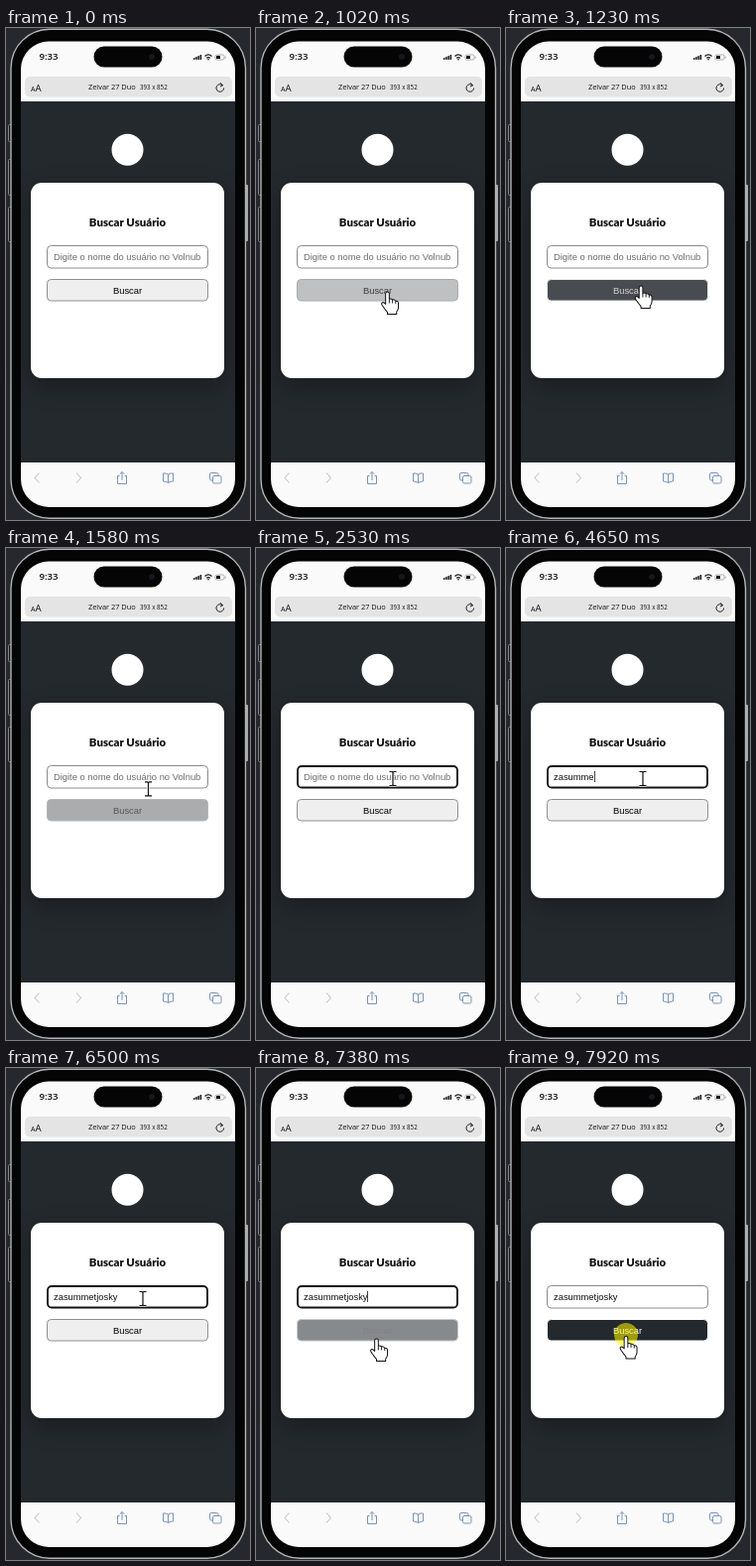
Write an HTML page with a canvas that moves like this. It is 246 px wide and 496 px high and loops after 8 s.

```html
<!DOCTYPE html>
<html lang="pt-BR">
<head>
<meta charset="utf-8">
<title>Buscar Usuário</title>
<style>
html, body { margin: 0; width: 100%; height: 100%; overflow: hidden; background: #26282d; }
canvas { display: block; width: 246px; height: 496px; }
</style>
</head>
<body>
<canvas id="stage"></canvas>
<script>
const canvas = document.getElementById('stage');
const ctx = canvas.getContext('2d');
const W = 246, H = 496, LOOP = 8000;
const dpr = window.devicePixelRatio || 1;
canvas.width = W * dpr;
canvas.height = H * dpr;

const SANS = '"Liberation Sans", Arial, sans-serif';
const UI = '"Open Sans", "Noto Sans", sans-serif';
const FIELD_FONT = '9.37px ' + SANS;
const USER = 'zasummetjosky';
const KEYS = [3060, 3260, 3590, 3720, 4320, 4520, 4650, 4980, 5180, 5380, 5510, 5640, 5970];
const FOCUS = 1990, BLUR = 7920, BLINK = 530;
const HOVER_MS = 600, ENTER_1 = 917, LEAVE_1 = 1365, ENTER_2 = 7202;

// pointer path: time, x, y
const PATH = [
  [460, 215, 486], [600, 190, 405], [760, 160, 325], [917, 138, 274.5],
  [1020, 132.5, 266], [1230, 136, 260], [1300, 140, 255], [1365, 142, 251],
  [1580, 143.5, 243], [1790, 141, 236], [1990, 138, 232.5], [7080, 138, 232.5],
  [7202, 133, 255], [7270, 127, 268], [7380, 121.5, 273], [7700, 121, 270.5], [8000, 121, 270.5]
];

function pointerAt(t) {
  if (t < PATH[0][0]) return null;
  const i = Math.max(1, PATH.findIndex(k => k[0] > t));
  const [t0, x0, y0] = PATH[i - 1], [t1, x1, y1] = PATH[i];
  const k = (t - t0) / (t1 - t0);
  return { x: x0 + (x1 - x0) * k, y: y0 + (y1 - y0) * k };
}

// CSS "ease": cubic-bezier(.25, .1, .25, 1)
function ease(x) {
  if (x <= 0) return 0;
  if (x >= 1) return 1;
  const curve = (a, b, s) => 3 * a * s * (1 - s) ** 2 + 3 * b * s * s * (1 - s) + s ** 3;
  let lo = 0, hi = 1;
  for (let i = 0; i < 20; i++) {
    const mid = (lo + hi) / 2;
    if (curve(0.25, 0.25, mid) < x) lo = mid; else hi = mid;
  }
  return curve(0.1, 1, lo);
}

function hoverAt(t) {
  if (t >= ENTER_2) return ease((t - ENTER_2) / HOVER_MS);
  if (t < LEAVE_1) return ease((t - ENTER_1) / HOVER_MS);
  const peak = ease((LEAVE_1 - ENTER_1) / HOVER_MS);
  return peak * (1 - ease((t - LEAVE_1) / (HOVER_MS * peak)));
}

function mix(a, b, k) {
  return 'rgb(' + a.map((v, i) => Math.round(v + (b[i] - v) * k)).join(',') + ')';
}

function box(x, y, w, h, r, fill, stroke, line = 1) {
  ctx.beginPath();
  ctx.roundRect(x, y, w, h, r);
  if (fill) { ctx.fillStyle = fill; ctx.fill(); }
  if (stroke) { ctx.strokeStyle = stroke; ctx.lineWidth = line; ctx.stroke(); }
}

function disc(x, y, r, fill) {
  ctx.beginPath();
  ctx.arc(x, y, r, 0, Math.PI * 2);
  ctx.fillStyle = fill;
  ctx.fill();
}

function text(str, x, y, font, fill, align = 'left') {
  ctx.font = font;
  ctx.fillStyle = fill;
  ctx.textAlign = align;
  ctx.fillText(str, x, y);
}

function line(d, color, width = 1) {
  ctx.strokeStyle = color;
  ctx.lineWidth = width;
  ctx.stroke(new Path2D(d));
}

function drawPhone() {
  ctx.fillStyle = '#26282d';
  ctx.fillRect(0, 0, W, H);
  for (const [y, h] of [[97.5, 17], [132.5, 36], [180.5, 35]])
    box(2.5, y, 3, h, 1, '#17181a', '#85868a');
  box(241, 158, 3, 57, 1, '#a9aaac');
  box(5, 1.2, 236.5, 493, 39, '#050505', '#b4b5b7', 1.4);

  ctx.save();
  ctx.beginPath();
  ctx.roundRect(15, 13.5, 216, 469.5, 28);
  ctx.clip();
  ctx.fillStyle = '#fafafa';
  ctx.fillRect(14, 13, 218, 471);
  ctx.fillStyle = '#24292e';
  ctx.fillRect(14, 74, 218, 364);
  ctx.restore();
}

function drawStatus() {
  box(88.5, 18.5, 69, 21, 10.5, '#050506');
  disc(147, 29, 3, '#15171c');
  text('9:33', 33.5, 32, '600 9.6px ' + UI, '#111');
  for (let i = 0; i < 4; i++) box(189 + i * 2.2, 30 - i, 1.5, 2 + i, 0.4, '#111');
  line('M200.5 28.5Q204 25.2 207.5 28.5M202.2 30.3Q204 28.8 205.8 30.3', '#111', 1.2);
  disc(204, 31.8, 0.8, '#111');
  box(211, 27, 9, 5, 1.5, null, '#999', 0.8);
  box(212, 28, 4, 3, 0.6, '#111');
  box(220.7, 28.6, 0.9, 2, 0.4, '#999');
}

function drawAddressBar() {
  box(19, 49, 209, 20.5, 5, '#e4e4e5');
  text('A', 25, 64, '7px ' + UI, '#111');
  text('A', 29.5, 64, '9.6px ' + UI, '#111');
  text('Zelvar 27 Duo', 83, 62.3, '7.4px ' + UI, '#111');
  text('393 x 852', 135, 62.3, '6.2px ' + UI, '#111');
  line('M218.5 57.8A3.8 3.8 0 1 0 219.6 60.5', '#222');
  line('M216 55.2L218.6 57.8L216 59', '#222');
}

function drawToolbar() {
  const blue = '#6b88b0', gray = '#c6c8cb';
  line('M33.5 448.5L29 453.5L33.5 458.5M71 448.5L75.5 453.5L71 458.5', gray, 1.1);
  line('M114.5 451.5H112.5V459.5H121.5V451.5H119.5M117 456V447.5M114.8 449.7L117 447.5L119.2 449.700', blue, 0.9);
  line('M163.5 450Q161 448.5 158.5 449V457Q161 457 163.5 458.5Q166 457 168.5 457V449Q166 448.5 163.5 450V458.5', blue, 0.9);
  box(205.5, 448.5, 8.5, 7.5, 1.5, null, blue, 0.9);
  box(208.5, 451.5, 8.5, 7.5, 1.5, '#fafafa', blue, 0.9);
}

function drawCard() {
  disc(122.5, 122.8, 16, '#fff');
  ctx.save();
  ctx.shadowColor = 'rgba(0,0,0,.3)';
  ctx.shadowBlur = 24 * dpr;
  ctx.shadowOffsetY = 8 * dpr;
  box(25, 156, 195, 197, 11, '#fff');
  ctx.restore();
  text('Buscar Usuário', 122.5, 200, '900 11.4px Lato, "Open Sans", sans-serif', '#111', 'center');
}

function drawField(t) {
  const focused = t >= FOCUS && t < BLUR;
  if (focused) box(42, 220, 161, 21.5, 4, '#fff', '#111', 1.8);
  else box(41.5, 219.5, 162, 22.5, 4, '#fff', '#8a8a8a');

  const count = KEYS.filter(k => k <= t).length;
  const typed = USER.slice(0, count);
  if (count) text(typed, 48, 234.2, FIELD_FONT, '#111');
  else text('Digite o nome do usuário no Volnub', 48, 234.2, FIELD_FONT, '#6c6c6c');

  // each key press restarts the blink
  const since = t - (count ? KEYS[count - 1] : 2000);
  if (focused && Math.floor(Math.max(0, since) / BLINK) % 2 === 0) {
    ctx.font = FIELD_FONT;
    ctx.fillStyle = '#444';
    ctx.fillRect(Math.round(48 + ctx.measureText(typed).width), 225, 1, 11);
  }
}

function drawButton(t) {
  const p = hoverAt(t);
  box(41.5, 253.5, 162, 21.5, 4,
    mix([239, 239, 239], [36, 41, 46], p), mix([143, 143, 143], [255, 255, 255], p));
  text('Buscar', 122.5, 268, FIELD_FONT, mix([0, 0, 0], [255, 255, 255], p), 'center');
}

const HAND = new Path2D('M-2 2Q-2 0 0 0Q2 0 2 2V8Q4 7 5.5 8.5Q7.5 8 9 10Q11.5 9.7 12 12V17Q12 20 10 22V24.5H0V22.5Q-3 19 -6 14.5Q-7 12 -5 11.5Q-3.5 11.5 -2 13.5Z');
const ARROW = new Path2D('M0 0V16L3.7 12.5L6.3 18.5L8.8 17.4L6.2 11.6H11.5Z');
const BEAM = 'M-3.5 -7H-1Q0 -7 0 -6Q0 -7 1 -7H3.5M0 -6V6M-3.5 7H-1Q0 7 0 6Q0 7 1 7H3.5';

function drawPointer(t) {
  const pos = pointerAt(t);
  if (!pos) return;
  const { x, y } = pos;
  ctx.save();
  ctx.translate(x, y);
  ctx.lineJoin = 'round';
  if (y >= 219 && y < 244) {
    line(BEAM, 'rgba(255,255,255,.8)', 2.6);
    line(BEAM, '#111', 1.2);
  } else {
    const hand = y >= 253 && y < 275;
    const shape = hand ? HAND : ARROW;
    if (hand) ctx.scale(0.92, 0.92);
    ctx.fillStyle = '#fff';
    ctx.fill(shape);
    ctx.strokeStyle = '#111';
    ctx.lineWidth = 1.1;
    ctx.stroke(shape);
    if (hand) line('M2 8V12.5M5.5 8.5V12.5M9 10V13', '#111');
  }
  ctx.restore();
}

function drawClick(t) {
  const yellow = 'rgba(255,245,0,.56)';
  if (t >= FOCUS && t < 2130) disc(136, 231, 12, yellow);
  if (t >= BLUR) disc(121, 269, 12, yellow);
}

function draw(t) {
  ctx.setTransform(dpr, 0, 0, dpr, 0, 0);
  drawPhone();
  drawStatus();
  drawAddressBar();
  drawToolbar();
  drawCard();
  drawField(t);
  drawButton(t);
  drawClick(t);
  drawPointer(t);
}

const start = performance.now();
function tick() {
  draw((performance.now() - start) % LOOP);
  requestAnimationFrame(tick);
}
tick();
</script>
</body>
</html>
```
